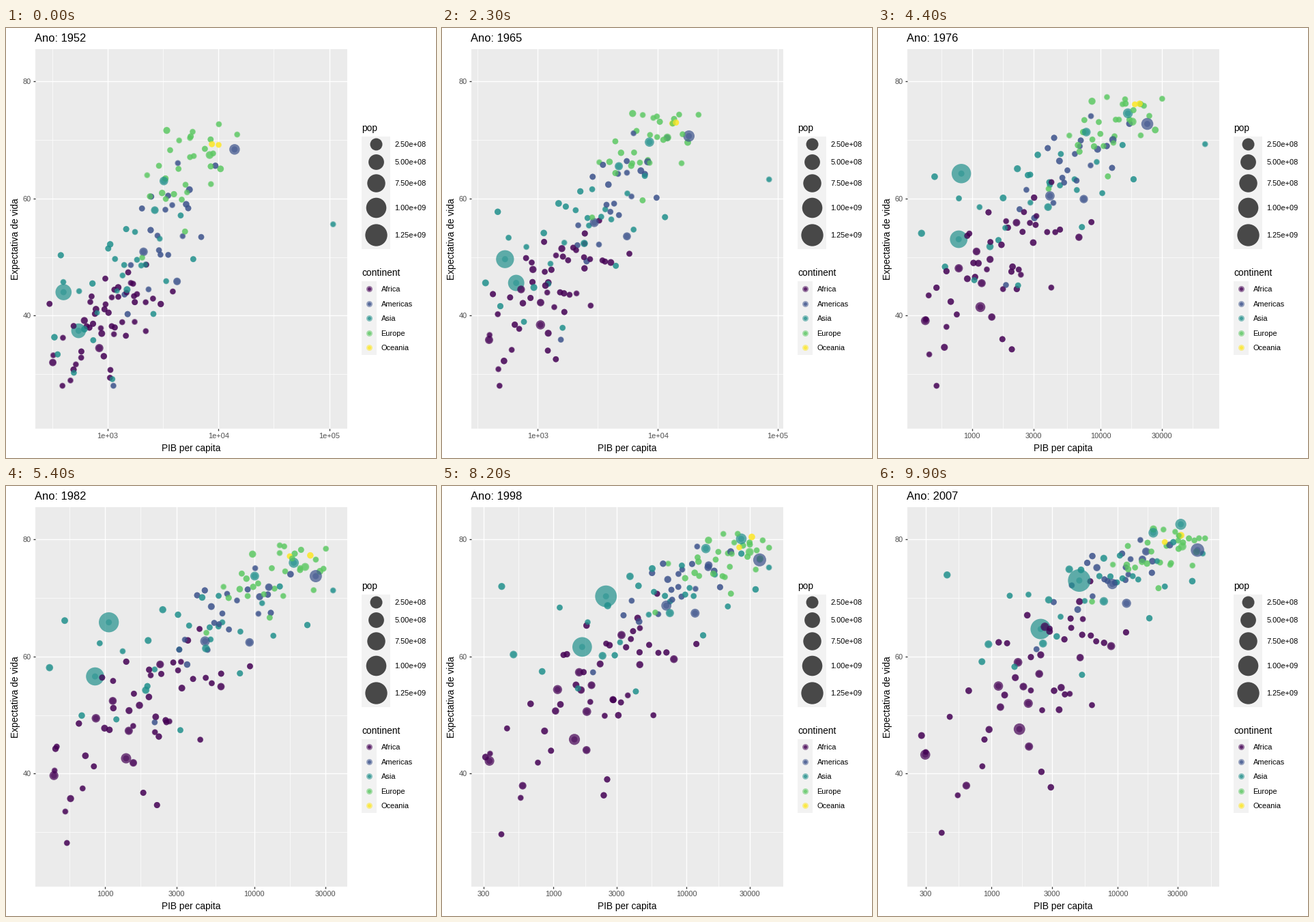
A matplotlib script for the animation above (10 s loop, 630 by 630 pixels).

```python
import matplotlib.pyplot as plt
import numpy as np
from matplotlib.animation import FuncAnimation
from matplotlib.patches import Rectangle

plt.rcParams["font.family"] = "Liberation Sans"

SIZE, DPI = 630, 90
FRAMES, INTERVAL = 100, 100
PX = 72 / DPI  # points per pixel
LEFT, RIGHT, TOP, BOTTOM = 43, 500, 30.8, 587.2
YEARS = np.arange(1952, 2008, 5)
SPAN = np.linspace(0, 1, len(YEARS))
EASE = SPAN * (3 - SPAN) / 2  # quick rise, then slower
MAX_POP = 1319
SKEW, CORRELATION = 0.12, 0.6

COLORS = {"Africa": "#440154", "Americas": "#3B528B", "Asia": "#21908C",
          "Europe": "#5DC863", "Oceania": "#FDE725"}
GROWTH = {"Africa": 3.3, "Americas": 2.1, "Asia": 2.4, "Europe": 1.2, "Oceania": 2.2}

# Largest and outermost points: continent, population in millions,
# then (year, income, life) keys.
LEADERS = [
    ("Africa", 8, (1952, 299, 42), (1975, 560, 45), (1997, 312, 42.6), (2007, 278, 46.5)),
    ("Americas", 157, (1952, 13990, 68.4), (2007, 42952, 78.2)),
    ("Americas", 70, (1952, 2109, 50.9), (2007, 9066, 72.4)),
    ("Asia", 556, (1952, 400, 44), (1962, 488, 44.5), (1972, 677, 63),
     (1992, 1656, 68.7), (2007, 4959, 73)),
    ("Asia", 430, (1952, 547, 37.4), (1982, 856, 56.6), (2007, 2452, 64.7)),
    ("Asia", 75, (1952, 3217, 63), (1972, 14779, 73.4), (2007, 31656, 82.6)),
    ("Asia", 0.5, (1952, 108382, 55.6), (1967, 80895, 64.6), (1972, 109348, 67.7),
     (1982, 33700, 71.3), (2007, 47307, 77.6)),
    ("Asia", 20, (1952, 331, 36.3), (1982, 424, 58.1), (1992, 347, 59.3),
     (2007, 944, 62.1)),
    ("Europe", 3.5, (1952, 10095, 72.7), (1997, 41283, 78.5), (2007, 49357, 80.2)),
]

# Crowds: count, then start and end of the mean and spread of log income
# and of the mean and spread of life.
CROWDS = {
    "Africa": (51, (3.0, 3.32), (0.25, 0.4), (39, 55), (5, 9)),
    "Americas": (23, (3.5, 3.97), (0.22, 0.25), (53.3, 73.8), (8, 3.6)),
    "Asia": (28, (3.1, 3.8), (0.34, 0.46), (46, 70.7), (8, 6.5)),
    "Europe": (29, (3.7, 4.36), (0.22, 0.22), (64.8, 77.8), (5, 2.7)),
    "Oceania": (2, (4.01, 4.47), (0.01, 0.1), (69.2, 80.7), (0.2, 0.7)),
}

rng = np.random.default_rng(11)


def spread(n):
    """Evenly spaced normal quantiles in random order."""
    sample = rng.normal(size=5000)
    return rng.permutation(np.quantile(sample, (np.arange(n) + 0.5) / n))


def ease(ends):
    return ends[0] + (ends[1] - ends[0]) * EASE


def grow(pop, continent):
    return pop * (1 + (GROWTH[continent] - 1) * SPAN)


def leader(continent, pop, *keys):
    year, income, life = np.array(keys, float).T
    return (np.interp(YEARS, year, np.log10(income)),
            np.interp(YEARS, year, life), grow(pop, continent))


def crowd(continent, low, high):
    n, *ranges = CROWDS[continent]
    mean_x, dev_x, mean_y, dev_y = map(ease, ranges)
    zx, zy = spread(n), spread(n)
    zy = CORRELATION * zx + np.sqrt(1 - CORRELATION ** 2) * zy
    zy -= SKEW * (zy ** 2 - 1)
    pops = 10 ** (0.75 + 0.45 * spread(n))
    for a, b, pop in zip(zx, zy, pops):
        x = mean_x + dev_x * (a - SKEW * SPAN * (a * a - 1))
        x += rng.normal(0, 0.03, len(YEARS))
        y = mean_y + dev_y * b + rng.normal(0, 0.5, len(YEARS))
        edge = 0.02 + 0.12 * rng.random()
        yield (np.clip(x, low + edge, high - edge), np.clip(y, 28, 82),
               grow(pop, continent))


tracks = [(row[0], leader(*row)) for row in LEADERS]
incomes = np.array([track[0] for _, track in tracks])
low, high = incomes.min(axis=0), incomes.max(axis=0)
for name in CROWDS:
    tracks += [(name, track) for track in crowd(name, low, high)]
tracks = [tracks[k] for k in rng.permutation(len(tracks))]
knots = np.array([track for _, track in tracks])
point_colors = [COLORS[name] for name, _ in tracks]


def pop_size(pop):
    return 2 + 10 * np.sqrt(pop / MAX_POP)


def area(size):
    """Marker area in square points for a dot of the given size in mm."""
    radius = 1.334 * size + 0.5
    return (2 * radius * PX) ** 2


def breaks(lo, hi):
    """Major ticks, labels and minor ticks of the log axis."""
    decades = np.arange(np.ceil(lo), np.floor(hi) + 1)
    if len(decades) >= 3:
        major, style = decades, ".0e"
    else:
        major = np.log10([m * 10 ** k for k in range(2, 6) for m in (1, 3)])
        major, style = major[(major >= lo) & (major <= hi)], ".0f"
    step = major[1] - major[0]
    padded = np.r_[major[0] - step, major, major[-1] + step]
    minor = (padded[1:] + padded[:-1]) / 2
    labels = [format(10 ** m, style) for m in major]
    return major, labels, minor[(minor > lo) & (minor < hi)]


fig = plt.figure(figsize=(SIZE / DPI, SIZE / DPI), dpi=DPI, facecolor="white")

# Page layer in pixels, origin at the top left.
page = fig.add_axes([0, 0, 1, 1])
page.set(xlim=(0, SIZE), ylim=(SIZE, 0))
page.axis("off")


def write(x, y, s, size, **kw):
    return page.text(x, y, s, fontsize=size, va="baseline", **kw)


def key_box(x, y, w, h):
    page.add_patch(Rectangle((x, y), w, h, fc="#F2F2F2", lw=0))


def dot(x, y, size, color, alpha):
    page.scatter([x], [y], s=area(size), c=color, alpha=alpha, linewidths=0)


title = write(42.5, 20.2, "", 13.2)
write((LEFT + RIGHT) / 2, 619.8, "PIB per capita", 11, ha="center")
page.text(21, (TOP + BOTTOM) / 2, "Expectativa de vida", fontsize=11, rotation=90,
          ha="right", va="center")

write(521, 151.2, "pop", 11)
key_box(521, 159, 41.6, 164.6)
y = 159
for pop in range(250, 1251, 250):
    size = pop_size(pop)
    height = max(21.6, size * DPI / 25.4)
    dot(541.8, y + height / 2, size, "black", 0.7)
    write(569.5, y + height / 2 + 4, f"{pop * 1e6:.2e}", 8.8)
    y += height

write(521, 362.8, "continent", 11)
key_box(521, 371.2, 21.6, 108)
for k, (name, color) in enumerate(COLORS.items()):
    y = 382 + 21.6 * k
    dot(531.8, y, 3, color, 0.5)
    dot(531.8, y, 1.5, color, 0.7)
    write(549.5, y + 4, name, 8.8)

ax = fig.add_axes([LEFT / SIZE, 1 - BOTTOM / SIZE,
                   (RIGHT - LEFT) / SIZE, (BOTTOM - TOP) / SIZE])
ax.set_facecolor("#EBEBEB")
ax.spines[:].set_visible(False)
ax.set_axisbelow(True)
ax.set_ylim(20.649, 85.553)
ax.set_yticks([40, 60, 80])
ax.set_yticks([30, 50, 70], minor=True)
ax.tick_params(length=2.75, width=1.07, pad=2.2, color="#333333",
               labelcolor="#4D4D4D", labelsize=8.8)
ax.tick_params(which="minor", length=0)
ax.grid(which="major", color="white", lw=1.07)
ax.grid(which="minor", color="white", lw=0.53)

rings = ax.scatter(*knots[:, :2, 0].T, s=area(3), c=point_colors, alpha=0.5,
                   linewidths=0)
bubbles = ax.scatter(*knots[:, :2, 0].T, c=point_colors, alpha=0.7, linewidths=0)


def update(i):
    year = 1952 + 55 * i / (FRAMES - 1)
    k = min(int((year - 1952) / 5), len(YEARS) - 2)
    t = (year - YEARS[k]) / 5
    x, y, pop = (knots[:, :, k] * (1 - t) + knots[:, :, k + 1] * t).T

    pad = 0.05 * np.ptp(x)
    lo, hi = x.min() - pad, x.max() + pad
    major, labels, minor = breaks(lo, hi)
    ax.set_xticks(major, labels)
    ax.set_xticks(minor, minor=True)
    ax.set_xlim(lo, hi)

    spots = np.column_stack([x, y])
    rings.set_offsets(spots)
    bubbles.set_offsets(spots)
    bubbles.set_sizes(area(pop_size(pop)))
    title.set_text(f"Ano: {round(year)}")
    return rings, bubbles, title


anim = FuncAnimation(fig, update, frames=FRAMES, interval=INTERVAL,
                     repeat=True, repeat_delay=0, blit=False)
plt.show()
```
